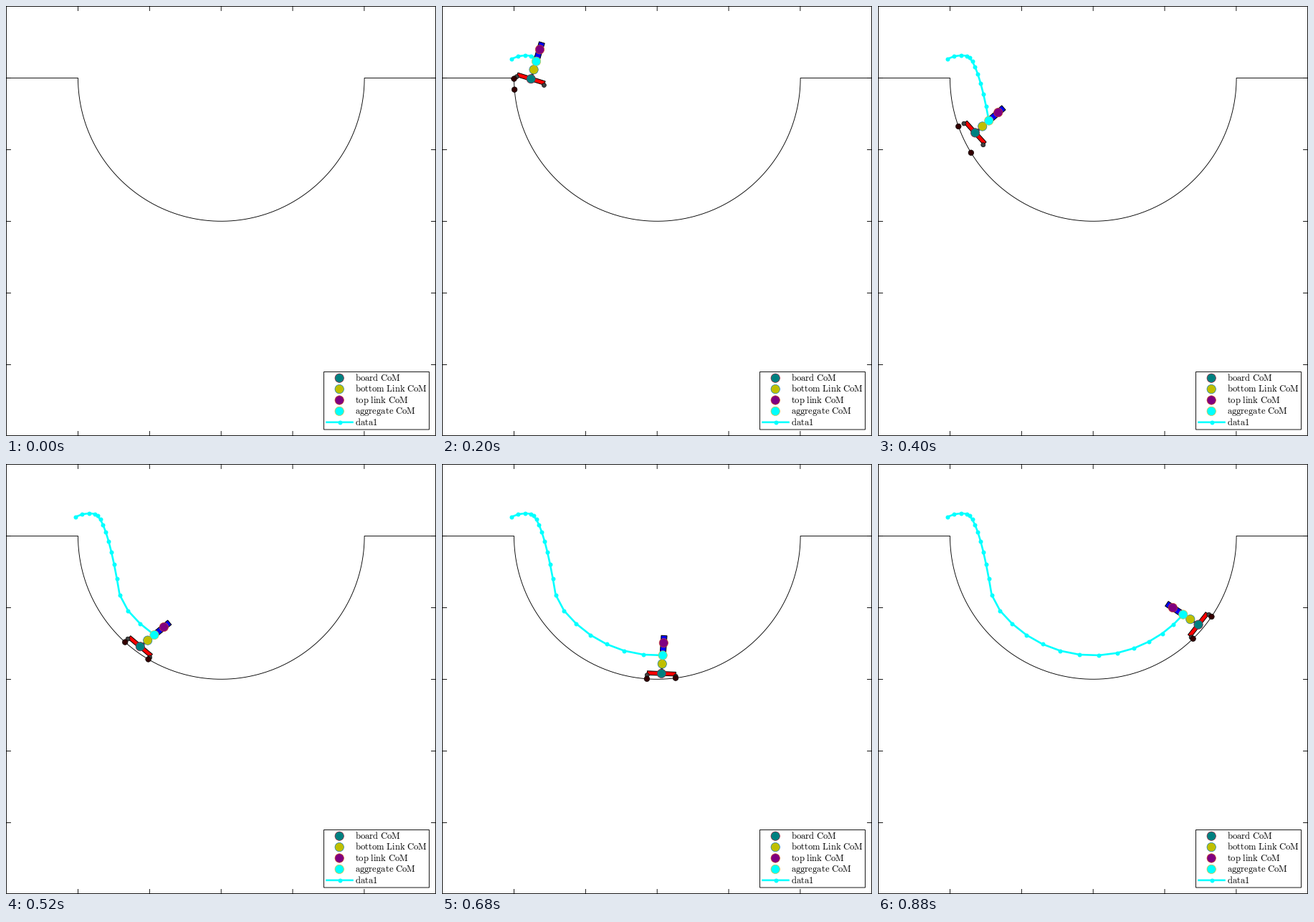
A matplotlib script that plays this animation: 600 px wide and 600 px high, repeating every 0.92 s.

```python
import numpy as np
import matplotlib.pyplot as plt
from matplotlib.animation import FuncAnimation
from matplotlib.patches import Circle, Polygon, Rectangle

plt.rcParams["mathtext.fontset"] = "cm"
plt.rcParams["path.snap"] = False

SIZE, DPI = 600, 100
PX = 72 / DPI                       # one pixel in points
FRAMES, INTERVAL = 23, 40
STEPS_PER_FRAME = 1.2               # simulation steps per displayed frame
LANDING = 13                        # last step of the drop
CENTER, RADIUS = np.array([299.8, 100.0]), 199.8
LEFT, RIGHT = CENTER[0] - RADIUS, CENTER[0] + RADIUS

TEAL, OLIVE, PURPLE, CYAN = (0, .5, .5), (.75, .75, 0), (.5, 0, .5), (0, 1, 1)
EDGES = {TEAL: (.635, .078, .184), OLIVE: (0, .447, .741),
         PURPLE: (.85, .325, .098), CYAN: (.929, .694, .125)}

# Rider's lean and board's tilt in degrees at a few key steps
KEYS = (1, 4, LANDING, 16, 20, 24, 26)
LEAN = (-42, 6, 54, 50.6, 4, -46.4, -56.5)
TILT = (0, 7, 53, 40, 2.3, -41, -52)

fig = plt.figure(figsize=(SIZE / DPI, SIZE / DPI), dpi=DPI, facecolor="white")
ax = fig.add_axes([0, 0, 1, 1])
ax.set_xlim(-.5, SIZE - .5)
ax.set_ylim(SIZE - .5, -.5)
ax.axis("off")


def line(x, y, color="black", width=.9, **kw):
    return ax.plot(x, y, color=color, lw=width * PX, **kw)[0]


def disc(radius, face, edge, z, at=(0, 0)):
    return ax.add_patch(Circle(at, radius, fc=face, ec=edge, lw=.6 * PX, zorder=z))


def com_marker(color, z, at=(0, 0)):
    return disc(6.2, color, EDGES[color], z, at)


def bar(face, z):
    return ax.add_patch(Polygon(np.zeros((4, 2)), fc=face, ec="black",
                                lw=PX, zorder=z))


def trail_line(x, y, z, **kw):
    return line(x, y, CYAN, 2.6, marker="o", ms=6 * PX, mew=0, zorder=z, **kw)


def draw_stage():
    end = SIZE - 1
    line([0, end, end, 0, 0], [0, 0, end, end, 0])
    for p in range(100, SIZE, 100):
        for a, b in ((0, 6), (end - 6, end)):
            line([p * end / SIZE + .2] * 2, [a, b])
            line([a, b], [p, p])
    t = np.linspace(np.pi, 0, 200)
    line([0, *(CENTER[0] + RADIUS * np.cos(t)), end],
         [100, *(CENTER[1] + RADIUS * np.sin(t)), 100])


def draw_legend():
    ax.add_patch(Rectangle((443, 510), 147, 80.5, fc="white", ec="black",
                           lw=.9 * PX, zorder=20))
    rows = (("board CoM", TEAL), ("bottom Link CoM", OLIVE),
            ("top link CoM", PURPLE), ("aggregate CoM", CYAN), ("data1", None))
    for i, (label, color) in enumerate(rows):
        y = 518.7 + 15.4 * i
        if color:
            com_marker(color, 21, (464.7, y))
        else:
            trail_line([447, 465, 483], [y] * 3, 21, markevery=[1])
        text = label.replace(" ", r"\ ")
        ax.text(486.3, y + 3.8, rf"$\mathrm{{{text}}}$", fontsize=9.1,
                va="baseline", zorder=21)


def mass_center(step):
    """Push-off and ballistic drop, then a swing along the bowl."""
    if step <= LANDING:
        t = step - 6
        push = max(0, 3.6 - step)
        return (131 + 3.87 * t - 6 * push,
                76.8 + 6.35 * t + 1.24 * t * t - push)
    u = step - 19
    angle = np.radians(6.6 - 9.5 * u + .055 * u * u + .17 * u * abs(u))
    return CENTER + 166.6 * np.array([-np.sin(angle), np.cos(angle)])


def on_ramp(p):
    """Closest point of the ramp surface."""
    if p[0] < LEFT or p[1] < CENTER[1]:
        return min(p[0], LEFT), CENTER[1]
    d = p - CENTER
    return CENTER + d * RADIUS / np.hypot(*d)


def place_bar(patch, origin, along, start, stop, half):
    side = np.array([-along[1], along[0]]) * half
    a, b = origin + along * start, origin + along * stop
    patch.set_xy([a - side, b - side, b + side, a + side])


draw_stage()
draw_legend()

path = np.array([mass_center(k) for k in range(1, KEYS[-1] + 1)])
trail = trail_line([], [], 3)
board = bar((1, 0, 0), 5)
leg = bar((.2, .3, .2), 5)
torso = bar((0, 0, 1), 5)
wheels = [disc(3, (.25, .25, .25), "black", 6) for _ in range(2)]
contacts = [disc(3.8, (.2, 0, 0), "black", 7) for _ in range(2)]
# Distance of each centre of mass from the board along the body
masses = [(com_marker(TEAL, 8), 0), (com_marker(OLIVE, 9), 13.5),
          (com_marker(PURPLE, 10), 42.8), (com_marker(CYAN, 11), 25.5)]
artists = [trail, board, leg, torso, *wheels, *contacts, *(m for m, _ in masses)]


def update(i):
    step = round(STEPS_PER_FRAME * i)
    for a in artists:
        a.set_visible(step > 0)
    if step == 0:
        return artists
    lean, tilt = (np.radians(np.interp(step, KEYS, v)) for v in (LEAN, TILT))
    up = np.array([np.sin(lean), -np.cos(lean)])
    along = np.array([np.cos(tilt), np.sin(tilt)])
    down = np.array([-along[1], along[0]])
    base = path[step - 1] - 25.5 * up

    trail.set_data(*path[:step].T)
    place_bar(board, base, along, -20, 20, 2.8)
    place_bar(leg, base, up, 0, 27, 1)
    place_bar(torso, base, up, 27, 53, 4)
    for x, wheel, contact in zip((-20, 20), wheels, contacts):
        axle = base + x * along
        wheel.center = axle + 3 * down
        contact.center = on_ramp(axle + 6 * down)
    for marker, height in masses:
        marker.center = base + height * up
    return artists


anim = FuncAnimation(fig, update, frames=FRAMES, interval=INTERVAL,
                     repeat=True, repeat_delay=0, blit=False)
plt.show()
```
